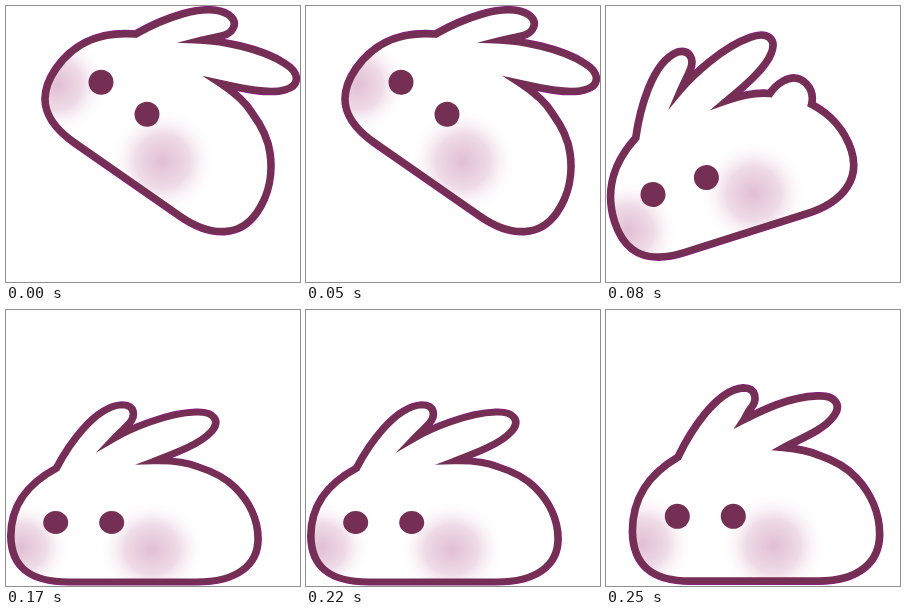
Write an HTML page that moves like this. It is 294x276 px and loops after 0.33 s.

```html
<!DOCTYPE html>
<html lang="en">
<head>
<meta charset="utf-8">
<title>Hopping bunny</title>
<style>
  html, body { margin: 0; width: 100%; height: 100%; overflow: hidden; background: #fff; }
  svg { display: block; width: 294px; height: 276px; }
</style>
</head>
<body>
<svg viewBox="0 0 294 276">
  <defs>
    <radialGradient id="blush">
      <stop offset="0" stop-color="#e0bfd3"/>
      <stop offset=".5" stop-color="#efdbe7"/>
      <stop offset="1" stop-color="#fff" stop-opacity="0"/>
    </radialGradient>
    <path id="shape"/>
    <clipPath id="inside"><use href="#shape"/></clipPath>
  </defs>
  <g id="bunny" stroke-miterlimit="20">
    <use href="#shape" fill="none" stroke="#8a1c80" stroke-width="8.4"/>
    <use href="#shape" fill="#fff"/>
    <g clip-path="url(#inside)" fill="url(#blush)">
      <circle cx="36" cy="233" r="51"/>
      <circle cx="167" cy="235.5" r="54"/>
    </g>
    <use href="#shape" fill="none" stroke="#752f55" stroke-width="6.9"/>
    <g fill="#752f55">
      <circle cx="71" cy="206" r="12.5"/>
      <circle cx="127" cy="206" r="12.5"/>
    </g>
  </g>
</svg>
<script>
const bunny = document.getElementById('bunny');
const shape = document.getElementById('shape');

// Notch between the ears, and between the rear ear and the back:
// corner point plus the angles at which its two edges leave.
const deep = [{ x: 128.5, y: 115, a: -49.4, b: -32.4 }, { x: 169, y: 139, a: -22.4, b: -1.6 }];
const soft = [{ x: 137, y: 110, a: -57, b: -27 }, { x: 176.5, y: 137.5, a: -29, b: 5 }];

const handle = (n, deg, len) => {
  const r = deg * Math.PI / 180;
  return `${n.x + len * Math.cos(r)} ${n.y + len * Math.sin(r)}`;
};

function outline([n, m], tail) {
  const back = tail
    ? 'C221 139 238 132 247 142 C254 150 254 160 249 168'
    : 'C229 151 241 158 250 168';
  return `M72 147 C84 122 110 80 137 78 C150 78 151 90 144 98
    C140 103 ${handle(n, n.a, 8)} ${n.x} ${n.y}
    C${handle(n, n.b, 20)} 182 87 211 86 C229 85 236 95 226 107
    C216 120 ${handle(m, m.a, 20)} ${m.x} ${m.y}
    C${handle(m, m.b, 18)} 203 141 213 145.5 ${back}
    C264 183 273 203 273 224 C273 252 252 270.5 212 270.5
    H84 C46 270.5 27 255 26.5 221 C26.5 187 43 164 72 147 Z`;
}

// Place the bunny by its left eye.
const place = (x, y, turn, squash = 1) =>
  `translate(${x} ${y}) rotate(${turn}) scale(1 ${squash}) translate(-71 -206)`;

const poses = [
  { end: 80, at: place(95, 76.3, 34.8), d: outline(deep) },
  { end: 170, at: place(47, 188.5, -17.6), d: outline(deep, true) },
  { end: 250, at: place(49.7, 212.5, 0, 0.917), d: outline(deep) },
  { end: 330, at: place(71.3, 206.3, 0), d: outline(soft) }
];

let shown;
function draw(ms) {
  const t = ms % 330;
  const pose = poses.find(p => t < p.end);
  if (pose === shown) return;
  shown = pose;
  shape.setAttribute('d', pose.d);
  bunny.setAttribute('transform', pose.at);
}

const start = performance.now();
function tick() {
  draw(performance.now() - start);
  requestAnimationFrame(tick);
}
tick();
</script>
</body>
</html>
```
